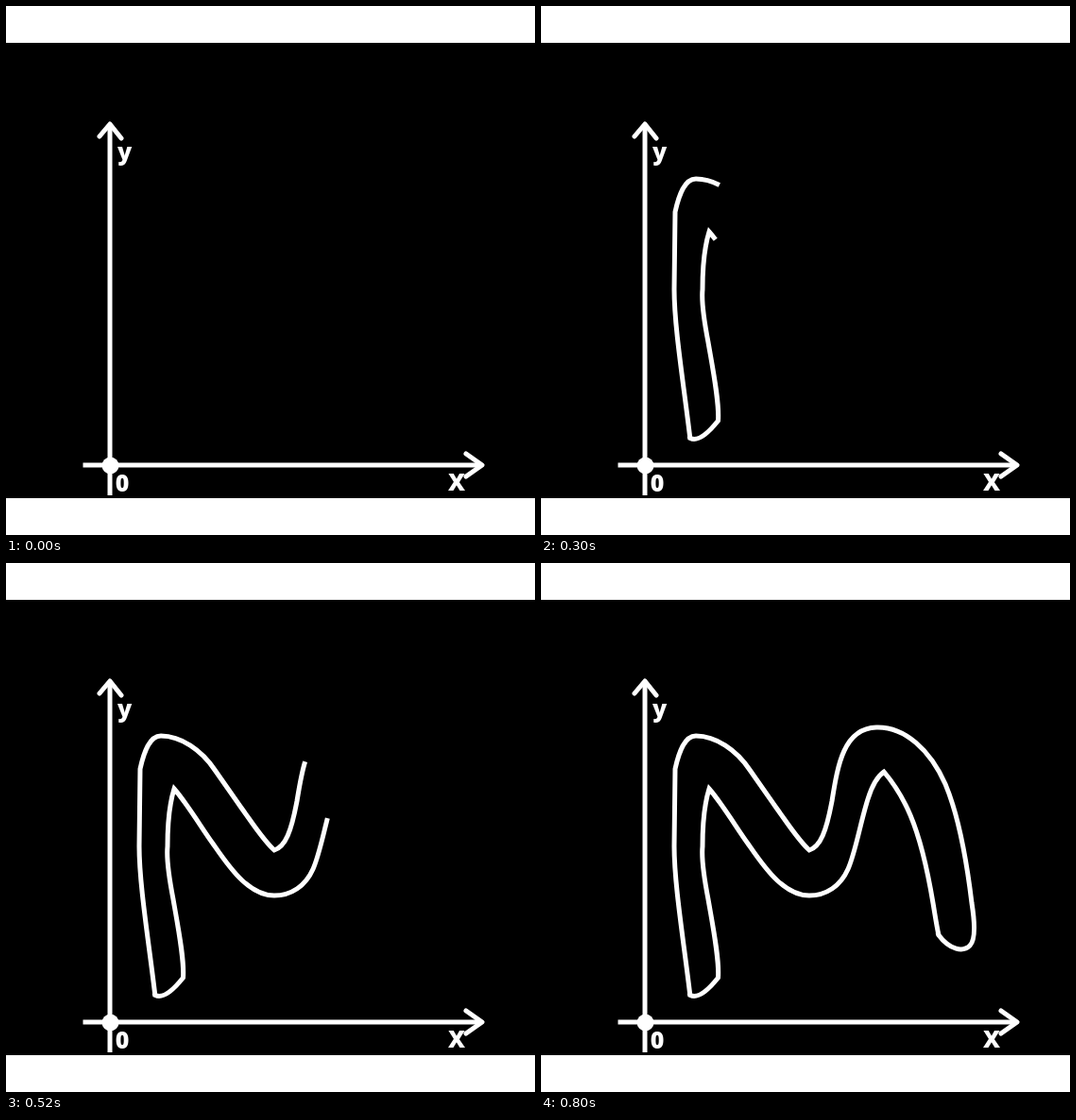
An HTML page for the animation above (3 s loop, 560 by 560 pixels).

```html
<!DOCTYPE html>
<html lang="en">
<head>
<meta charset="utf-8">
<title>Curve on axes</title>
<style>
  html, body { margin: 0; width: 100%; height: 100%; overflow: hidden; background: #fff; }
  svg { display: block; width: 560px; height: 560px; }
  .line { fill: none; stroke: #fff; stroke-width: 5; stroke-miterlimit: 6; }
  text {
    fill: #fff; text-anchor: middle;
    font: 800 25px "Open Sans", "Noto Sans", sans-serif;
    font-stretch: 75%;
  }
</style>
</head>
<body>
<svg viewBox="0 0 560 560">
  <rect y="39" width="560" height="482"/>
  <g class="line">
    <path d="M110 518V125M81.500 486H504"/>
    <path d="M99 138L110 125L122 140M487 474L504 486L487 498" stroke-linecap="round" stroke-linejoin="round"/>
  </g>
  <circle cx="110.500" cy="486.500" r="9" fill="#fff"/>
  <text x="125.500" y="163">y</text>
  <text x="123" y="513.500">0</text>
  <text x="477" y="512.500">X</text>
  <path id="outer" class="line" d="M158 459C151 400 141 340 141 300L142 218
    C146 200 152 183 164 183C185 183 207 198 221 219L249 259
    C262 277 272 293 284 304C296 300 302 284 308 252C314 215 320 175 355 174
    C385 173 412 198 428 234C441 265 450 310 456 360
    C460 385 459 400 454 405C447 412 433 410 421 394L420 391"/>
  <path id="inner" class="line" d="M157 455L158 457.500C165 461 174 456 187.500 439
    C189 420 182 385 177 356C171 325 170 310 171 300C171 280 173 255 178 239
    C192 255 208 282 219 297C228 310 238 325 250 336C262 347 272 352 284 352
    C302 352 317 342 325 324C333 306 338 275 346 250C350 237 356 226 363 221
    C374 234 383 248 391 267C402 293 410 330 415 360C418 378 419 385 421 394"/>
</svg>
<script>
const LOOP = 3000;
const TIMES = [100, 140, 180, 220, 260, 300, 360, 400, 440, 480, 520, 560, 600, 640, 680, 720, 760, 800];

// Pen positions after the given number of steps
const STOPS = [4, 6, 9, 13, 16];
const pens = [
  makePen("outer", [[141, 307], [189, 189], [282, 303], [396, 193], [456, 360]]),
  makePen("inner", [[171, 305], [184, 248], [302, 348], [382, 250], [421, 394]])
];

function nearestLength(path, [x, y], from) {
  let best = from, least = Infinity;
  for (let s = from; s <= path.getTotalLength(); s += 0.5) {
    const p = path.getPointAtLength(s);
    const d = Math.hypot(p.x - x, p.y - y);
    if (d < least) { least = d; best = s; }
  }
  return best;
}

function makePen(id, points) {
  const path = document.getElementById(id);
  const keys = [[0, 0]];
  points.forEach((point, i) => {
    keys.push([STOPS[i], nearestLength(path, point, keys[i][1])]);
  });
  keys.push([TIMES.length, path.getTotalLength() + 1]);
  return { path, keys };
}

function lengthAt(keys, step) {
  const i = Math.max(1, keys.findIndex(key => key[0] >= step));
  const [s0, l0] = keys[i - 1], [s1, l1] = keys[i];
  return l0 + (l1 - l0) * (step - s0) / (s1 - s0);
}

function draw() {
  const t = performance.now() % LOOP;
  const step = TIMES.filter(time => time <= t).length;
  for (const { path, keys } of pens) {
    path.style.visibility = step ? "visible" : "hidden";
    path.style.strokeDasharray = `${lengthAt(keys, step)} 5000`;
  }
  requestAnimationFrame(draw);
}
draw();
</script>
</body>
</html>
```
